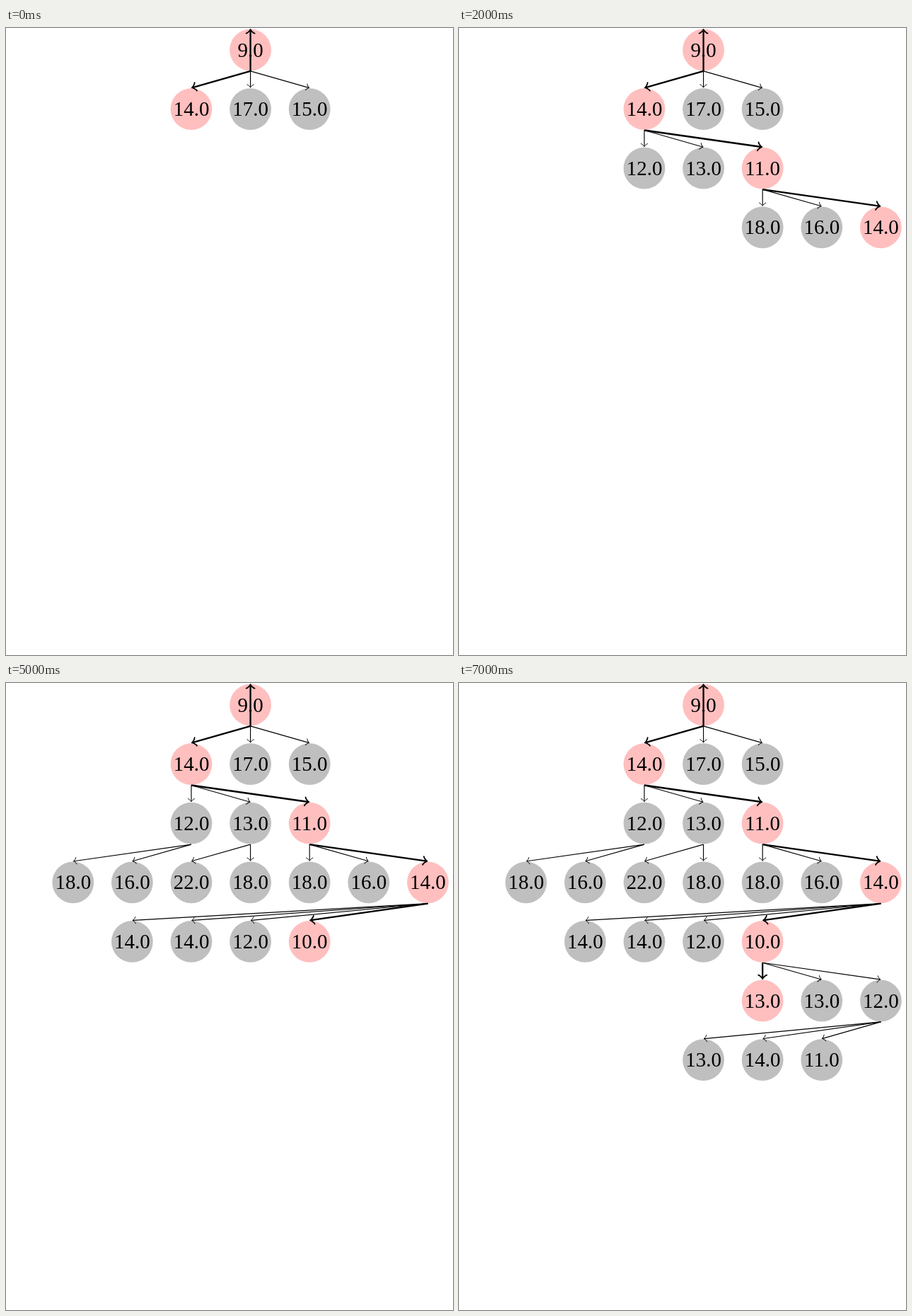
Animation of 632x886 px, one loop 8 s. Source, as an HTML page with a canvas:

```html
<!DOCTYPE html>
<html lang="en">
<head>
<meta charset="utf-8">
<style>
html, body { margin: 0; height: 100%; overflow: hidden; background: #fff; }
canvas { display: block; }
</style>
</head>
<body>
<canvas width="632" height="886"></canvas>
<script>
const ctx = document.querySelector('canvas').getContext('2d');
const STEP = 1000, LOOP = 8000;
const GAP = 83.6, RADIUS = 29.4, PORT = 29.9, PT = 2.88;

// One expansion per step: parent column and row, first child column,
// child values, index of the chosen child
const expansions = [
  { col: 3, row: 0, first: 2, values: [14, 17, 15], best: 0 },
  { col: 2, row: 1, first: 2, values: [12, 13, 11], best: 2 },
  { col: 4, row: 2, first: 4, values: [18, 16, 14], best: 2 },
  { col: 2, row: 2, first: 0, values: [18, 16] },
  { col: 3, row: 2, first: 2, values: [22, 18] },
  { col: 6, row: 3, first: 1, values: [14, 14, 12, 10], best: 3 },
  { col: 4, row: 4, first: 4, values: [13, 13, 12], best: 0 },
  { col: 6, row: 5, first: 3, values: [13, 14, 11] },
];

const nodeX = col => 94.8 + GAP * col;
const nodeY = row => 31 + GAP * row;

function drawNode(col, row, value, chosen) {
  const x = nodeX(col), y = nodeY(row);
  ctx.fillStyle = chosen ? '#ffbfbf' : '#bfbfbf';
  ctx.beginPath();
  ctx.arc(x, y, RADIUS, 0, 2 * Math.PI);
  ctx.fill();
  ctx.fillStyle = '#000';
  ctx.fillText(value.toFixed(1), x, y + 9.5);
}

function drawArrow(x1, y1, x2, y2, bold) {
  const width = (bold ? 0.8 : 0.4) * PT;
  const a = 0.28 * PT + 0.3 * width;
  const end = Math.hypot(x2 - x1, y2 - y1) - 0.21 * PT - 0.625 * width;
  ctx.save();
  ctx.translate(x1, y1);
  ctx.rotate(Math.atan2(y2 - y1, x2 - x1));
  ctx.lineWidth = width;
  ctx.lineCap = 'butt';
  ctx.beginPath();
  ctx.moveTo(0, 0);
  ctx.lineTo(end, 0);
  ctx.stroke();

  ctx.translate(end, 0);
  ctx.lineWidth = 0.8 * width;
  ctx.lineCap = ctx.lineJoin = 'round';
  ctx.beginPath();
  ctx.moveTo(-3 * a, 4 * a);
  ctx.bezierCurveTo(-2.75 * a, 2.5 * a, 0, 0.25 * a, 0.75 * a, 0);
  ctx.bezierCurveTo(0, -0.25 * a, -2.75 * a, -2.5 * a, -3 * a, -4 * a);
  ctx.stroke();
  ctx.restore();
}

function expand({ col, row, first, values, best }) {
  values.forEach((value, i) => {
    const chosen = i === best;
    drawNode(first + i, row + 1, value, chosen);
    drawArrow(nodeX(col), nodeY(row) + PORT,
      nodeX(first + i), nodeY(row + 1) - PORT, chosen);
  });
}

function draw(time) {
  ctx.fillStyle = '#fff';
  ctx.fillRect(0, 0, 632, 886);
  ctx.font = '29px "Liberation Serif", serif';
  ctx.textAlign = 'center';
  ctx.strokeStyle = '#000';
  drawNode(3, 0, 9, true);
  drawArrow(nodeX(3), nodeY(0) + PORT, nodeX(3), nodeY(0) - PORT, true);
  expansions.slice(0, Math.floor(time % LOOP / STEP) + 1).forEach(expand);
}

const start = performance.now();
function tick() {
  draw(performance.now() - start);
  requestAnimationFrame(tick);
}
tick();
</script>
</body>
</html>
```
